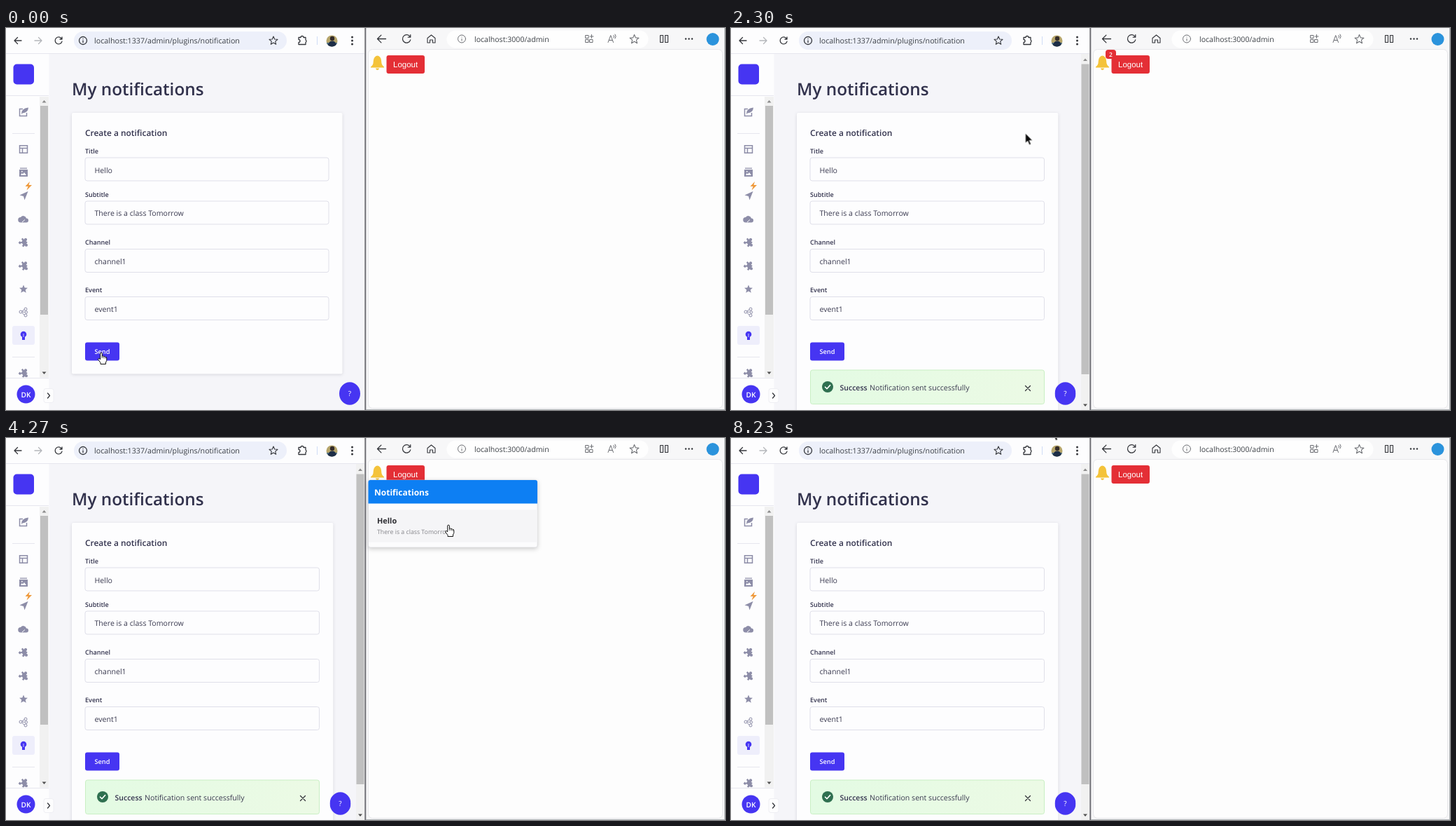
Recreate the animation shown at these times as an HTML page. Size 1027x545 px, loop 8260 ms.

```html
<!DOCTYPE html>
<html lang="en">
<head>
<meta charset="utf-8">
<title>My notifications</title>
<style>
html, body { margin: 0; width: 100%; height: 100%; overflow: hidden; background: #f5f5f9; }
svg { display: block; }
text { font-family: "Open Sans", "Noto Sans", sans-serif; font-size: 10.6px; fill: #3a3a50; text-rendering: geometricPrecision; }
.semi { font-weight: 600; fill: #32324d; }
.label { font-size: 9.05px; }
.url { fill: #3c4046; }
.white { fill: #fff; }
.line { fill: none; stroke: #34363b; stroke-width: 1.3; stroke-linecap: round; stroke-linejoin: round; }
.thin { stroke-width: 1.1; }
.pale { stroke: #6c6e73; stroke-width: 1; }
.purple { fill: #4635f2; }
.rule { stroke: #e6e6ee; stroke-width: 1; }
.side { fill: #8d8da8; }
.side .o { fill: none; stroke: #8d8da8; stroke-width: 1.5; }
.track { fill: #f1f1f1; }
.thumb { fill: #c0c0c0; }

.card, .field, .help, .sent, .unsent, .badge, .panel, .item, .body, .hand, .arrow { animation: 8.26s step-end infinite; }
.card { fill: #fdfdfe; filter: drop-shadow(0 1px 2px #21213426); animation-name: card; }
.field { x: 113px; height: 33px; rx: 3px; fill: #fdfdfe; stroke: #dfdfe9; animation-name: field; }
.help { animation-name: help; }
.sent { animation-name: sent; }
.badge { animation-name: badge; }
.panel { animation-name: panel; }
.item { animation-name: item; }
.body { fill: #fcfcfd; stroke: #d9d9dd; stroke-width: .6; filter: drop-shadow(0 2px 3px #0003); animation-name: body; }
.hand { animation-name: hand; }
.arrow { animation-name: arrow; }
.cursor { animation: move 8.26s ease-in-out infinite; }

@keyframes card { 0% { width: 386.5px; height: 372.5px } 7.5%, 100% { width: 373.3px; height: 440px } }
@keyframes field { 0% { width: 348px } 7.5%, 100% { width: 334.5px } }
@keyframes help { 0% { transform: translate(491px, 521.5px) } 7.5%, 100% { transform: translate(477.5px, 521.5px) } }
@keyframes sent { 0% { visibility: hidden } 7.5%, 100% { visibility: visible } }
@keyframes badge { 0% { visibility: hidden } 20% { visibility: visible } 38.1%, 100% { visibility: hidden } }
@keyframes panel { 0% { visibility: hidden } 38.1% { visibility: visible } 73.2%, 100% { visibility: hidden } }
@keyframes item { 0% { visibility: hidden } 38.1% { visibility: visible } 57.5%, 100% { visibility: hidden } }
@keyframes body { 0% { height: 96px } 57.5%, 100% { height: 50px } }
@keyframes hand {
  0% { opacity: 1 } 9% { opacity: 0 } 32% { opacity: 1 } 41.5% { opacity: 0 }
  46.5% { opacity: 1 } 57.5% { opacity: 0 } 70% { opacity: 1 } 75% { opacity: 0 } 100% { opacity: 0 }
}
@keyframes arrow {
  0% { opacity: 0 } 9% { opacity: 1 } 32% { opacity: 0 } 41.5% { opacity: 1 }
  46.5% { opacity: 0 } 57.5% { opacity: 1 } 70% { opacity: 0 } 75% { opacity: 1 } 100% { opacity: 1 }
}
@keyframes move {
  0%, 7.6% { transform: translate(136px, 463px) }
  15.7%, 20.5% { transform: translate(211px, 343.5px) }
  33%, 39% { transform: translate(533.5px, 46px) }
  49%, 61% { transform: translate(632px, 124px) }
  64.53% { transform: translate(609px, 127px); animation-timing-function: ease-out }
  71.5%, 73.8% { transform: translate(533px, 47px) }
  82%, 86% { transform: translate(730px, 232px) }
  99%, 100% { transform: translate(458.5px, -13px) }
}
</style>
</head>
<body>
<svg width="1027" height="545" viewBox="0 0 1027 545">
  <defs>
    <g id="puzzle">
      <g transform="rotate(40)">
        <path d="M-5-3.5H-1.7A2.1 2.1 0 1 1 1.7-3.5H4.5V-1A2.1 2.1 0 1 1 4.5 2.4V5.5H1.6A1.9 1.9 0 1 0-1.6 5.5H-5V2.4A1.9 1.9 0 1 0-5-1Z"/>
      </g>
    </g>
    <path id="star" d="M0-6 1.7-2 6-1.7 2.7 1.1 3.7 5.3 0 3-3.7 5.3-2.7 1.1-6-1.7-1.7-2Z"/>
    <path id="back" d="M5 0H-5M-.5-4.5-5 0-.5 4.5"/>
    <path id="reload" d="M4.5-2.6A5 5 0 1 0 5 1.2M5-5V-2H2"/>
    <g id="info"><circle r="5.5"/><path d="M0 0V2.6M0-2.5V-2.4"/></g>
    <clipPath id="sideClip"><path d="M0 98H48V498.500H0Z"/></clipPath>
    <clipPath id="faceClip"><circle cx="465.500" cy="18.500" r="8"/></clipPath>
    <linearGradient id="ok"><stop offset="0" stop-color="#e3fbe3"/><stop offset="1" stop-color="#ecfae5"/></linearGradient>
  </defs>

  <!-- Left window -->
  <rect width="513" height="545" fill="#f5f5f9"/>
  <rect width="513" height="36.500" fill="#fdfdfe"/>
  <path class="rule" d="M0 36.500H512"/>
  <rect x="97" y="5" width="304" height="26" rx="13" fill="#edf0fa"/>
  <g class="line">
    <use href="#back" x="17" y="18"/>
    <use href="#back" transform="translate(46 18) scale(-1 1)" stroke="#b4b6bb"/>
    <use href="#reload" x="75" y="18"/>
    <use href="#info" x="110" y="18"/>
    <use href="#star" x="382" y="18" class="thin"/>
    <path d="M418 13.500H421A2 2 0 0 1 425 13.500H428V17A2 2 0 0 1 428 20.500V23.500H418V20.500A2 2 0 0 0 418 16.500Z"/>
  </g>
  <text class="url" x="126" y="22" style="font-size:10.7px">localhost:1337/admin/plugins/notification</text>
  <path d="M444.500 12V24" stroke="#cfdcf6"/>
  <g clip-path="url(#faceClip)">
    <rect x="457" y="10" width="17" height="17" fill="#b6a56b"/>
    <path d="M457 21H474V27H457Z" fill="#4c7088"/>
    <circle cx="466" cy="15" r="3.200" fill="#342c2a"/>
    <path d="M459.500 27Q460 18.500 466 18.500T472 27Z" fill="#1d2d46"/>
  </g>
  <g fill="#34363b"><circle cx="494.500" cy="13" r="1.500"/><circle cx="494.500" cy="18" r="1.500"/><circle cx="494.500" cy="23" r="1.500"/></g>

  <!-- Form -->
  <text class="semi" x="94" y="96" style="font-size:24.3px">My notifications</text>
  <rect class="card" x="94" y="121" rx="2"/>
  <text class="semi" x="113" y="153.500" style="font-size:11.95px">Create a notification</text>
  <text class="semi label" x="113" y="178.500">Title</text>
  <rect class="field" y="185"/>
  <text x="126.500" y="206.500">Hello</text>
  <text class="semi label" x="113" y="240.500">Subtitle</text>
  <rect class="field" y="247"/>
  <text x="126.500" y="268">There is a class Tomorrow</text>
  <text class="semi label" x="113" y="308.500">Channel</text>
  <rect class="field" y="315.500"/>
  <text x="126.500" y="336.500">channel1</text>
  <text class="semi label" x="113" y="377">Event</text>
  <rect class="field" y="383.500"/>
  <text x="126.500" y="404.500">event1</text>
  <rect class="purple" x="113" y="448.500" width="49" height="26" rx="3"/>
  <text class="semi" x="126.500" y="465" style="font-size:9.2px;fill:#fff">Send</text>

  <g class="sent">
    <rect x="113.500" y="488" width="334" height="48.500" rx="3" fill="url(#ok)" stroke="#c9efc4"/>
    <circle cx="138" cy="512" r="8" fill="#2f7050"/>
    <path class="line" d="M134.500 512.200 137 514.700 141.600 509.600" style="stroke:#fff;stroke-width:1.6"/>
    <text class="semi" x="155.500" y="516.500" style="font-size:10.5px">Success</text>
    <text x="198" y="516.500">Notification sent successfully</text>
    <path class="line" d="M420.500 510.500 427.500 517.500M427.500 510.500 420.500 517.500"/>
    <path class="track" d="M500 37H512V545H500Z"/>
    <path class="thumb" d="M500.500 51.500H511.500V494H500.500Z"/>
    <path d="M503 47 506 43.500 509 47Z" fill="#8a8a8a"/>
    <path d="M503 536.500 506 540 509 536.500Z" fill="#505050"/>
  </g>
  <g class="help">
    <ellipse class="purple" rx="15" ry="16.300"/>
    <text class="white" y="3" text-anchor="middle" style="font-size:10px">?</text>
  </g>

  <!-- Sidebar -->
  <rect y="37" width="61.500" height="508" fill="#fdfdfe"/>
  <rect class="purple" x="10.500" y="51.500" width="29.500" height="29" rx="5"/>
  <path class="rule" d="M0 96.500H61M9 150.500H41M9 469.500H41M0 499.500H61"/>
  <path class="track" d="M48 98H61V498.500H48Z"/>
  <path class="thumb" d="M49 111H60V409H49Z"/>
  <path d="M51.500 106.500 54.500 103 57.500 106.500Z" fill="#8a8a8a"/>
  <path d="M51.500 490.500 54.500 494 57.500 490.500Z" fill="#505050"/>
  <rect x="9" y="425" width="32" height="27" rx="3" fill="#eeeefb"/>
  <g class="side" clip-path="url(#sideClip)">
    <g transform="translate(25 120)">
      <path class="o" d="M-1-4.500H-5.500V5.500H4.500V1"/>
      <path d="M-3 3Q-3.500-5.500 7-6.500 6.500 1-1.500 1.500Z"/>
    </g>
    <g transform="translate(25 173)">
      <path class="o" d="M-5.500-5.200H5.500V5.200H-5.500ZM-5.500-1.500H5.500M-1.500-1.500V5"/>
    </g>
    <g transform="translate(25 206)">
      <path d="M-5-6.500H5V-5.200H-5Z"/>
      <path fill-rule="evenodd" d="M-6-4H6V6H-6ZM-4 4H4L1 0-1 2.500-2.300 1ZM-3-2V-.4H-1.400V-2Z"/>
    </g>
    <path d="M31.500 233 19.500 238.500 25 240 26.500 245.500Z"/>
    <path d="M21 277.500A3.600 3.600 0 0 1 21 270A4.500 4.500 0 0 1 29 271.500A3 3 0 0 1 29 277.500Z"/>
    <path d="M23 277 27 273.500" stroke="#fdfdfe"/>
    <use href="#puzzle" x="25" y="305.500"/>
    <use href="#puzzle" x="25" y="339"/>
    <use href="#star" x="25" y="372.500"/>
    <g class="o" style="stroke-width:1">
      <circle cx="21" cy="405" r="2"/><circle cx="28" cy="401" r="2"/><circle cx="29" cy="405.500" r="1.700"/><circle cx="28" cy="410" r="2"/>
      <path d="M22.700 404 26 402M23 405.200H27M22.700 406.500 26 409"/>
    </g>
    <use href="#puzzle" x="25" y="492"/>
  </g>
  <path d="M34 219 27.500 226H31.500L29.500 231.500 37 224H32.500Z" fill="#ef9a3d"/>
  <g class="purple"><circle cx="25" cy="437" r="4.300"/><path d="M23 440H27V445H23Z"/><path d="M25 436V441" stroke="#eeeefb" stroke-width=".8"/></g>
  <circle class="purple" cx="28.500" cy="522.500" r="13"/>
  <text class="semi" x="28.500" y="526.500" text-anchor="middle" style="font-size:10.2px;fill:#fff">DK</text>
  <rect x="54" y="514.500" width="14" height="20" rx="3" fill="#fdfdfe" stroke="#eeeef3"/>
  <path class="line" d="M59.500 521 62.500 524.500 59.500 528"/>

  <!-- Right window -->
  <rect x="512" width="515" height="545" fill="#f7f7f8"/>
  <path d="M513.300 0V545" stroke="#707075" stroke-width="2"/>
  <rect x="517.500" y="30.500" width="506" height="512" rx="6" fill="#fdfdfd" stroke="#e7e7ea"/>
  <path d="M514 544.500H1027M1026.500 0V545" stroke="#aeb2b5" stroke-width="1"/>
  <rect x="629.500" y="3.500" width="288" height="25" rx="12.500" fill="#fefefe"/>
  <g class="line thin">
    <use href="#back" transform="translate(536.500 15.500) scale(1.200)"/>
    <use href="#reload" transform="translate(572 15.500) scale(1.150)"/>
    <path d="M602 14.500 607.500 10 613 14.500V21H609.500V17H605.500V21H602Z"/>
    <path d="M934.500 10.500H938.500V20.500H934.500ZM941.500 10.500H945.500V20.500H941.500Z"/>
    <g class="pale">
      <use href="#info" x="651" y="15.500"/>
      <path d="M828 10.500H832V14.500H828ZM828 16.500H832V20.500H828ZM834 16.500H838V20.500H834ZM836.500 9.500V14.500M834 12H839"/>
      <path d="M860 20.500 863.700 10.500 867.500 20.500M861.500 17.500H866M868 10.500Q869.500 12 868 14M870 9Q872.500 12 870 15"/>
      <use href="#star" transform="translate(897.500 16) scale(1.080)"/>
    </g>
  </g>
  <g fill="#34363b"><circle cx="971" cy="15.500" r="1.200"/><circle cx="975.500" cy="15.500" r="1.200"/><circle cx="980" cy="15.500" r="1.200"/></g>
  <circle cx="1009.500" cy="16" r="9" fill="#2b93dc"/>
  <text class="url" x="669" y="19.500">localhost:3000/admin</text>

  <g fill="#f4c33a">
    <path d="M530.500 39.500C524.500 40.500 525 47 524.500 50.500Q524 53.500 521 55.500V56.500H540V55.500Q537 53.500 536.500 50.500C536 47 536.500 40.500 530.500 39.500Z"/>
    <path d="M528 57.500H533Q532.500 60 530.500 60T528 57.500Z"/>
  </g>
  <rect x="543.500" y="39" width="54.500" height="26" rx="3" fill="#e42f36"/>
  <text class="white" x="553" y="56" style="font:11.5px 'Liberation Sans',Arial,sans-serif">Logout</text>
  <g class="badge">
    <rect x="535" y="31" width="15" height="13" rx="4" fill="#e42f36"/>
    <text class="white" x="542.500" y="40.500" text-anchor="middle" style="font-size:8.5px;font-weight:600">2</text>
  </g>

  <g class="panel">
    <rect class="body" x="517.500" y="60" width="241.500" rx="3"/>
    <path d="M517.500 93.500V63Q517.500 60 520.500 60H756Q759 60 759 63V93.500Z" fill="#0d7ff3"/>
    <text class="white" x="526" y="81.500" style="font-size:12px;font-weight:700">Notifications</text>
  </g>
  <g class="item">
    <path d="M518 102.500H758.700V148.500H518Z" fill="#f5f5f7"/>
    <text x="530" y="122" style="font-size:10.9px;font-weight:700;fill:#2c2c31">Hello</text>
    <text x="530" y="136.500" style="font-size:8.75px;fill:#85858a">There is a class Tomorrow</text>
  </g>

  <!-- Pointer, hotspot at 0,0 -->
  <g class="cursor">
    <path class="arrow" d="M0 0V14L3.200 11 5.600 16.500 8 15.500 5.600 10.200H10Z" fill="#0a0a0a" stroke="#fff" stroke-width=".7"/>
    <g class="hand">
      <path d="M-1.300.8Q0-.8 1.300.8V5.200Q3 4.300 3.800 5.700 5.400 5 6 6.500 7.800 6.200 7.800 8V11.500L6.500 14V16.500H-1V14.500L-4.500 9.800Q-4.300 7.800-2.600 8.700L-1.300 10Z" fill="#fff" stroke="#111" stroke-width="1"/>
      <path d="M1.300 5V8M3.800 6V8.300M6 6.800V8.500" stroke="#111" stroke-width=".8"/>
    </g>
  </g>
</svg>
</body>
</html>
```
